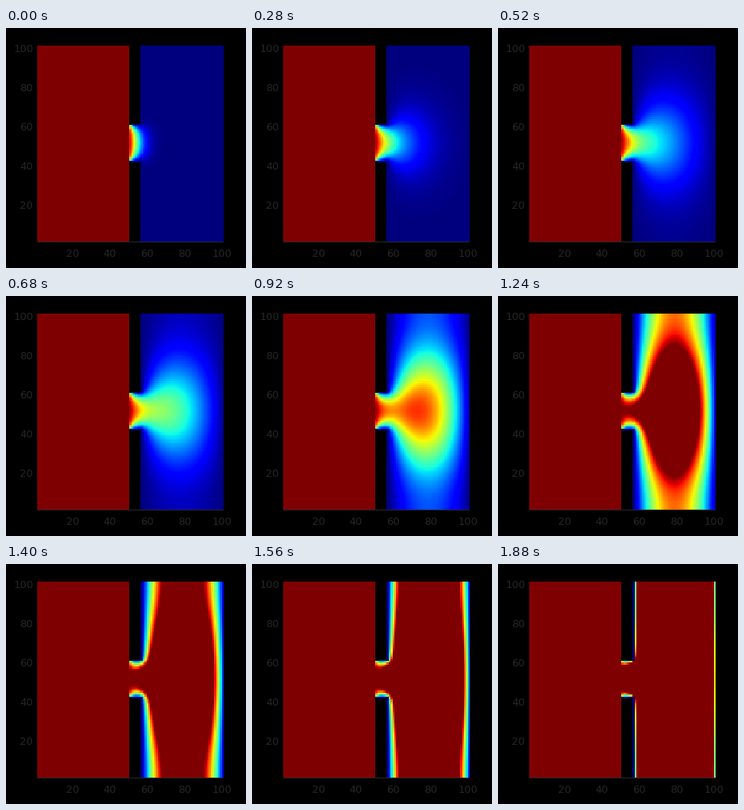
These frames come from a looping animation (300x300 px, 1920 ms). A matplotlib script:

```python
import numpy as np
import matplotlib.pyplot as plt
from matplotlib.animation import FuncAnimation

SIZE = 300
FRAMES, INTERVAL = 48, 40
N = 100                      # nodes per side
SRC, EXIT = 48, 55           # last source column, far side of the wall
LOW, HIGH = 40, 59           # gap edges
D, GROWTH = 20.0, 0.213      # diffusion and growth per frame
STEPS = 100

rows, cols = np.mgrid[:N, :N]
outside = (rows <= LOW) | (rows >= HIGH)
in_wall = (cols > SRC) & (cols < EXIT)
fixed = ((cols > SRC) & (cols <= EXIT) & outside) | (cols == N - 1)
hidden = in_wall & ((rows < LOW) | (rows >= HIGH))


def simulate():
    """Diffusion with linear growth behind a constant source."""
    dt = 1.0 / STEPS
    free = (~fixed[:, SRC:]).astype(float)
    free[:, 0] = 0
    free = free[:, 1:-1]
    u = np.zeros((N + 2, N - SRC))     # one ghost row above and below
    u[:, 0] = 1
    states = []
    for _ in range(FRAMES):
        for _ in range(STEPS):
            u[0], u[-1] = u[1], u[-2]
            mid = u[1:-1, 1:-1]
            lap = (u[2:, 1:-1] + u[:-2, 1:-1] + u[1:-1, 2:]
                   + u[1:-1, :-2] - 4 * mid)
            u[1:-1, 1:-1] = (mid + dt * (D * lap + GROWTH * mid)) * free
        full = np.ones((N, N))
        full[:, SRC:] = u[1:-1]
        states.append(np.ma.array(full, mask=hidden)[:-1, :-1])
    return states


states = simulate()

fig = plt.figure(figsize=(3, 3), dpi=100, facecolor="black")
ax = fig.add_axes([39 / SIZE, 33 / SIZE, 233 / SIZE, 245 / SIZE])
ax.axis("off")
cmap = plt.get_cmap("jet").copy()
cmap.set_bad("black")
image = ax.imshow(states[0], cmap=cmap, vmin=0, vmax=1, origin="lower",
                  aspect="auto", interpolation="nearest")

INK = "#262626"
page = fig.add_axes([0, 0, 1, 1])
page.set(xlim=(0, SIZE), ylim=(SIZE, 0))
page.axis("off")
page.add_patch(plt.Rectangle((39, 267), 233, 1, fc=INK, lw=0))


def label(x, y, value, align):
    page.text(x, y, str(value), color=INK, size=9.36, ha=align,
              va="baseline", family="DejaVu Sans")


for k in range(5):
    value = 20 * (k + 1)
    label(83.3 + 46.75 * k, 286, value, "center")
    label(34, 226 - 49.1 * k, value, "right")


def update(i):
    image.set_data(states[i])
    return [image]


anim = FuncAnimation(fig, update, frames=FRAMES, interval=INTERVAL,
                     repeat=True, repeat_delay=0, blit=False)
plt.show()
```
